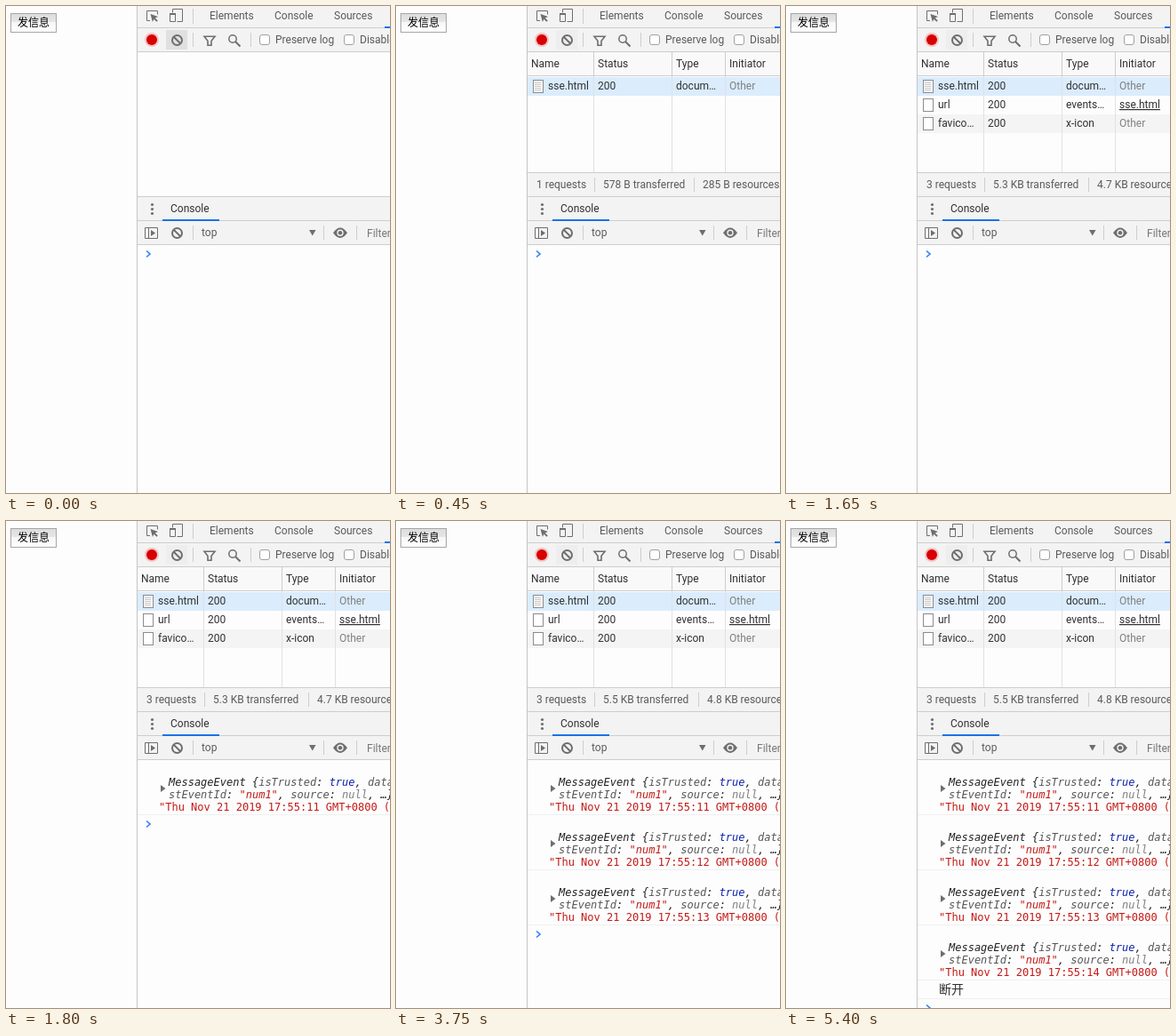
An HTML page that plays this animation: 432x548 px, repeating every 6.9 s.

```html
<!DOCTYPE html>
<html lang="en">
<head>
<meta charset="utf-8">
<title>Server-sent events in the inspector</title>
<style>
  html, body { margin: 0; width: 100%; height: 100%; overflow: hidden; background: #fdfdfd; }
  svg { display: block; width: 432px; height: 548px; }
  text { font: 12px Roboto, Arial, sans-serif; fill: #303030; white-space: pre; }
  .mono { font: 12px "DejaVu Sans Mono", monospace; fill: #222; }
  .object { font-style: italic; }
  .cjk { font-family: "Noto Sans CJK SC", "Noto Sans CJK", sans-serif; }
  .key { fill: #565656; }
  .null { fill: #808080; }
  .bool { fill: #0d22aa; }
  .str { fill: #c41a16; }
  .icon { fill: none; stroke: #6e6e6e; }
</style>
</head>
<body>
<svg id="stage" viewBox="0 0 432 548"></svg>
<script>
const LOOP = 6900;
const GRAY = '#6e6e6e', BAR = '#f3f3f3', LINE = '#cdcdcd', BLUE = '#1a73e8', TAB = '#5a5a5a';

const rect = (x, y, w, h, fill, extra = '') =>
  `<rect x="${x}" y="${y}" width="${w}" height="${h}" fill="${fill}" ${extra}/>`;
const hLine = (y, color = LINE) => rect(148, y, 284, 1, color);
const vLine = (x, y, h, color = LINE) => rect(x, y, 1, h, color);
const text = (x, y, s, fill = '#303030', extra = '') =>
  `<text x="${x}" y="${y}" style="fill:${fill}" ${extra}>${s}</text>`;
const icon = (d, width = 1) => `<path class="icon" d="${d}" stroke-width="${width}"/>`;
const solid = (d, fill = GRAY) => `<path d="${d}" fill="${fill}"/>`;
const circle = (x, y, r, fill) => `<circle cx="${x}" cy="${y}" r="${r}" fill="${fill}"/>`;
const box = (x, y, w, h, stroke, fill = '#fff', r = 0) =>
  rect(x + .5, y + .5, w - 1, h - 1, fill, `stroke="${stroke}" rx="${r}"`);
const span = (cls, s) => `<tspan class="${cls}">${s}</tspan>`;

const clearIcon = y =>
  `<circle class="icon" cx="192.5" cy="${y}" r="5.5" stroke-width="2"/>` +
  icon(`M188.7 ${y - 3.8}l7.6 7.6`, 2);

function page() {
  return `<defs><linearGradient id="bevel" x2="0" y2="1">
      <stop offset="0" stop-color="#dcdcdc"/><stop offset=".45" stop-color="#e6e6e6"/>
      <stop offset=".46" stop-color="#f6f6f6"/><stop offset="1" stop-color="#fff"/>
    </linearGradient></defs>` +
    rect(0, 0, 432, 548, '#fdfdfd') +
    box(5, 8, 52, 22, '#a6a6a6', 'url(#bevel)') +
    text(13, 23, '发信息', '#000', 'class="cjk"') +
    vLine(147, 0, 548, '#c4c4c4');
}

function topBars(pressed) {
  return rect(148, 0, 284, 51, BAR) + hLine(24) + hLine(51) +
    icon('M162 16.5h-3.5v-11h12v4') + solid('M162.5 9l8.5 3-3.2 1.4 3 3-1.4 1.4-3-3-1.5 3.2z') +
    icon('M187.5 7.5v-4h11v14h-6') + icon('M184.5 8.5h6v9h-6z') + rect(184, 8, 7, 2, GRAY) +
    vLine(210, 3, 17) +
    text(229, 15, 'Elements', TAB) + text(302, 15, 'Console', TAB) + text(369, 15, 'Sources', TAB) +
    rect(426, 23, 6, 2, BLUE) +
    circle(164, 38, 8, '#f2c4c4') + circle(164, 38, 6, '#d80000') +
    rect(180, 27, 24, 22, pressed ? '#e0e0e0' : '#eeeeee') + clearIcon(38.5) +
    vLine(210, 30, 16) + vLine(275, 30, 16) +
    icon('M223 34.2h12l-4 5v5h-4v-5z', 1.6) +
    `<circle class="icon" cx="255" cy="37" r="4.2" stroke-width="1.5"/>` + icon('M258 40l5.5 5.5', 2) +
    box(285, 32, 12, 12, '#a0a0a0', '#fff', 2.5) + text(303, 42, 'Preserve log', TAB) +
    box(380, 32, 12, 12, '#a0a0a0', '#fff', 2.5) + text(398, 42, 'Disable cache', TAB);
}

function drawer() {
  return rect(148, 214, 284, 54, BAR) + hLine(214) + hLine(241) + hLine(268) +
    [223.5, 228.5, 233.5].map(y => circle(164.5, y, 1.6, GRAY)).join('') +
    text(185, 232, 'Console') + rect(176, 240, 64, 2, BLUE) +
    icon('M156.5 249.5h14v12h-14zM160.5 249.5v12') + solid('M163 252l5 3.5-5 3.5z') +
    clearIcon(255.5) + vLine(210, 247, 16) + text(220, 259, 'top', TAB) +
    solid('M341 252h7.5l-3.75 6.5z') + vLine(357, 247, 16) +
    solid('M368 255.2q8-11.4 16 0q-8 11.4-16 0z') + circle(376, 255.2, 3.7, BAR) +
    circle(376, 255.2, 2.3, GRAY) + vLine(394, 247, 16) + text(406, 260, 'Filter', '#777');
}

function requestRow(index, [name, status, type, initiator], selected) {
  const y = 80 + 21 * index, base = y + 14;
  const fill = selected ? '#dbecfd' : index % 2 ? '#fdfdfd' : '#f4f4f4';
  const lines = index ? '' : icon('M156 86.5h7M156 88.5h7M156 90.5h7M156 92.5h7M156 94.5h7', .4);
  return rect(148, y, 284, 21, fill) + box(154, y + 3, 12, 15, '#8c8c8c') + lines +
    text(171, base, name) + text(227, base, status, status === '200' ? '#303030' : '#808080') +
    text(315, base, type) +
    (initiator === 'Other' ? text(375, base, initiator, '#808080')
      : text(375, base, initiator, '#303030', 'text-decoration="underline"'));
}

function network(t) {
  if (t < 300) return '';
  const rows = [['sse.html', '200', 'docum…', 'Other']];
  if (t >= 600) rows.push(
    ['url', t < 1650 ? '(pending)' : '200', 'events…', 'sse.html'],
    ['favico…', '200', 'x-icon', 'Other']);
  const sent = t < 450 ? '293 B' : t < 600 ? '578 B'
    : `${t < 1650 ? 5.2 : t < 2700 ? 5.3 : t < 3750 ? 5.4 : 5.5} KB`;
  const size = t < 450 ? '0 B' : t < 600 ? '285 B'
    : `${t < 1650 ? 4.6 : t < 3750 ? 4.7 : 4.8} KB`;
  const split = t < 600 ? 335 : 340;
  return rect(148, 52, 284, 27, '#f9f9f9') + hLine(78) +
    rows.map((row, i) => requestRow(i, row, i === 0 && t >= 450)).join('') +
    [222, 310, 370].map(x => vLine(x, 52, 27) + vLine(x, 79, 108, '#e1e1e1')).join('') +
    ['Name', 'Status', 'Type', 'Initiator'].map((s, i) => text([152, 227, 315, 375][i], 69, s)).join('') +
    rect(148, 187, 284, 27, BAR) + hLine(187) +
    text(158, 205, `${rows.length} requests`, TAB) + vLine(223, 193, 16) +
    text(233, 205, `${sent} transferred`, TAB) + vLine(split, 193, 16) +
    text(split + 10, 205, `${size} resources`, TAB);
}

function message(index) {
  const y = 62 * index;
  const line = (x, base, cls, s) => `<text class="mono ${cls}" x="${x}" y="${base + y}">${s}</text>`;
  return solid(`M174 ${297 + y}l5.5 4-5.5 4z`) +
    line(183, 298, 'object', `MessageEvent {${span('key', 'isTrusted')}: ${span('bool', 'true')}, ${span('key', 'data')}`) +
    line(183, 312, 'object', `${span('key', 'stEventId')}: ${span('str', '"num1"')}, ${span('key', 'source')}: ${span('null', 'null')}, …}`) +
    line(172, 326, 'str', `"Thu Nov 21 2019 17:55:${11 + index} GMT+0800 (`) +
    hLine(330 + y, '#f0f0f0');
}

function consoleLog(t) {
  const count = [1800, 2700, 3750, 4800].filter(at => t >= at).length;
  const closed = t >= 5400;
  const y = 279 + 62 * count + (closed ? 21 : 0);
  return Array.from({ length: count }, (_, i) => message(i)).join('') +
    (closed ? text(172, 532, '断开', '#303030', 'class="cjk" font-size="14" ').replace('style="', 'style="font-size:14px;') +
      hLine(537, '#f0f0f0') : '') +
    `<path d="M158 ${y - 3.5}l4 3.5-4 3.5" fill="none" stroke="#367cf1" stroke-width="1.6"/>`;
}

const stage = document.getElementById('stage');
let shown = '';
function frame(now) {
  const t = now % LOOP;
  const markup = page() + topBars(t < 150) + network(t) + drawer() + consoleLog(t);
  if (markup !== shown) stage.innerHTML = shown = markup;
  requestAnimationFrame(frame);
}
frame(0);
</script>
</body>
</html>
```
